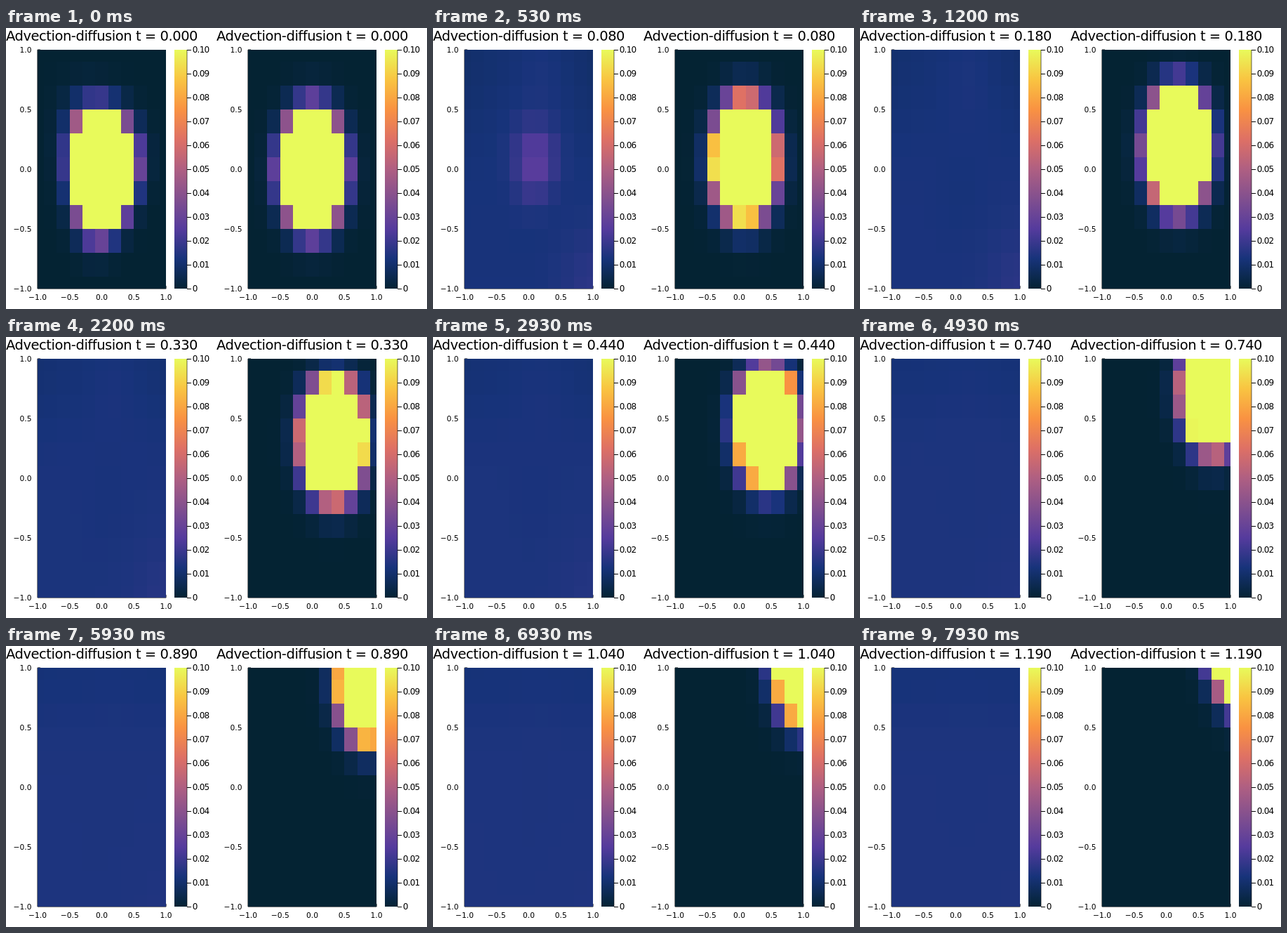
An HTML page for the animation above (8 s loop, 600 by 400 pixels).

```html
<!DOCTYPE html>
<html lang="en">
<head>
<meta charset="utf-8">
<title>Advection-diffusion</title>
<style>
  html, body { margin: 0; width: 100%; height: 100%; overflow: hidden; background: #fff; }
  svg { display: block; width: 600px; height: 400px; }
  text { font-family: "DejaVu Sans", sans-serif; font-size: 10.67px; }
  .title { font-size: 19.5px; letter-spacing: -.45px; text-anchor: middle; }
  .bar { font-size: 12px; letter-spacing: -.75px; }
  .cells, .tick { shape-rendering: crispEdges; }
  path { stroke: #000; fill: none; }
</style>
</head>
<body>
<svg id="stage" viewBox="0 0 600 400" xmlns="http://www.w3.org/2000/svg"></svg>
<script>
const LOOP = 8000, STEPS = 120, N = 11;
const LEFT = 45, TOP = 31, WIDTH = 183, HEIGHT = 340;
const RIGHT = LEFT + WIDTH, BOTTOM = TOP + HEIGHT;
const VALUE_MAX = .1;
const stage = document.getElementById('stage');

// Evenly spaced thermal colours, low to high
const thermal = ['#042333', '#17337a', '#553b9d', '#814f8f', '#af5f82',
  '#de7065', '#f99242', '#f9c441', '#e8fa5b'];
const last = thermal.length - 1;
const channels = hex => [1, 3, 5].map(i => parseInt(hex.slice(i, i + 2), 16));

function colour(value) {
  const v = Math.min(1, Math.max(0, value / VALUE_MAX)) * last;
  const i = Math.min(last - 1, Math.floor(v));
  const from = channels(thermal[i]), to = channels(thermal[i + 1]);
  return `rgb(${from.map((c, n) => Math.round(c + (to[n] - c) * (v - i)))})`;
}

function add(tag, attrs, parent = stage, text = '') {
  const node = document.createElementNS(stage.namespaceURI, tag);
  for (const key in attrs) node.setAttribute(key, attrs[key]);
  node.textContent = text;
  parent.appendChild(node);
  return node;
}

const bell = (dx, dy, width) => Math.exp(-(dx * dx + dy * dy) / width);
const exact = (x, y, t) => bell(x - t, y - t, .1);

// Nearly flat state that the fitted solution falls to
function plateau(x, y, t) {
  const k = Math.exp(-2.5 * t);
  return .0139 - .0012 * k
    + .005 * k * bell(x - 1, y + 1, .25)
    + .0025 * k * bell(x - .2, y - .8, .15)
    - .0012 * k * bell(x - .1, y + .2, .15)
    - (.0015 + .002 * k * x * x) * bell(0, 1 - y, .15 + .5 * k);
}

// The fit starts as a slightly skewed bell and collapses quickly
function fitted(x, y, t) {
  const fade = Math.exp(-50 * t);
  const skew = .87 * Math.exp((x - y) * (.4 + 4.5 * x * y));
  return exact(x, y, t) * skew * fade + plateau(x, y, t) * (1 - fade);
}

function makePanel(offset, field) {
  const panel = add('g', { transform: `translate(${offset} 0)` });
  const px = x => LEFT + (x + 1) * WIDTH / 2;
  const py = y => TOP + (1 - y) * HEIGHT / 2;
  const clip = v => Math.max(-1, Math.min(1, v));
  const title = add('text', { class: 'title', x: 136.5, y: 18 }, panel);

  // Axes lie under the cells, so only their outer half shows
  add('path', { d: `M${LEFT} ${TOP}V${BOTTOM}H${RIGHT}v-4M${LEFT} ${TOP}h4` }, panel);
  for (let v = -1; v <= 1; v += .5) {
    const label = v.toFixed(1).replace('-', '\u2212');
    add('text', { x: 36.5, y: py(v) + 4, 'text-anchor': 'end' }, panel, label);
    add('text', { x: px(v), y: 387, 'text-anchor': 'middle' }, panel, label);
  }

  const group = add('g', { class: 'cells' }, panel), cells = [];
  for (let j = 0; j < N; j++) for (let i = 0; i < N; i++) {
    const x = i / 5 - 1, y = j / 5 - 1;
    const [x0, x1] = [x - .1, x + .1].map(v => Math.round(px(clip(v))));
    const [y0, y1] = [y + .1, y - .1].map(v => Math.round(py(clip(v))));
    const rect = add('rect', { x: x0, y: y0, width: x1 - x0, height: y1 - y0 }, group);
    cells.push({ x, y, rect });
  }

  add('rect', { x: 240, y: TOP, width: 18, height: HEIGHT, fill: 'url(#thermal)' }, panel);
  add('path', { d: `M258 ${TOP}V${BOTTOM}`, 'stroke-opacity': .6 }, panel);
  for (let i = 0; i <= 10; i++) {
    const y = BOTTOM - i * HEIGHT / 10;
    add('path', { class: 'tick', d: `M258 ${y + .5}h6` }, panel);
    add('text', { class: 'bar', x: 265.7, y: y + 4.4 }, panel, i ? (i / 100).toFixed(2) : '0');
  }

  return t => {
    title.textContent = `Advection-diffusion t = ${t.toFixed(3)}`;
    for (const { x, y, rect } of cells) rect.setAttribute('fill', colour(field(x, y, t)));
  };
}

const gradient = add('linearGradient', { id: 'thermal', x1: 0, y1: 1, x2: 0, y2: 0 });
thermal.forEach((c, i) => add('stop', { offset: i / last, 'stop-color': c }, gradient));

const panels = [makePanel(0, fitted), makePanel(300, exact)];
const begin = performance.now();
let shown = -1;

function draw() {
  const time = Math.max(0, performance.now() - begin) % LOOP;
  // Step times are rounded to hundredths of a second
  const step = Math.min(STEPS - 1, Math.floor((time + 5) * STEPS / LOOP));
  if (step !== shown) {
    panels.forEach(update => update(step / 100));
    shown = step;
  }
  requestAnimationFrame(draw);
}
draw();
</script>
</body>
</html>
```
